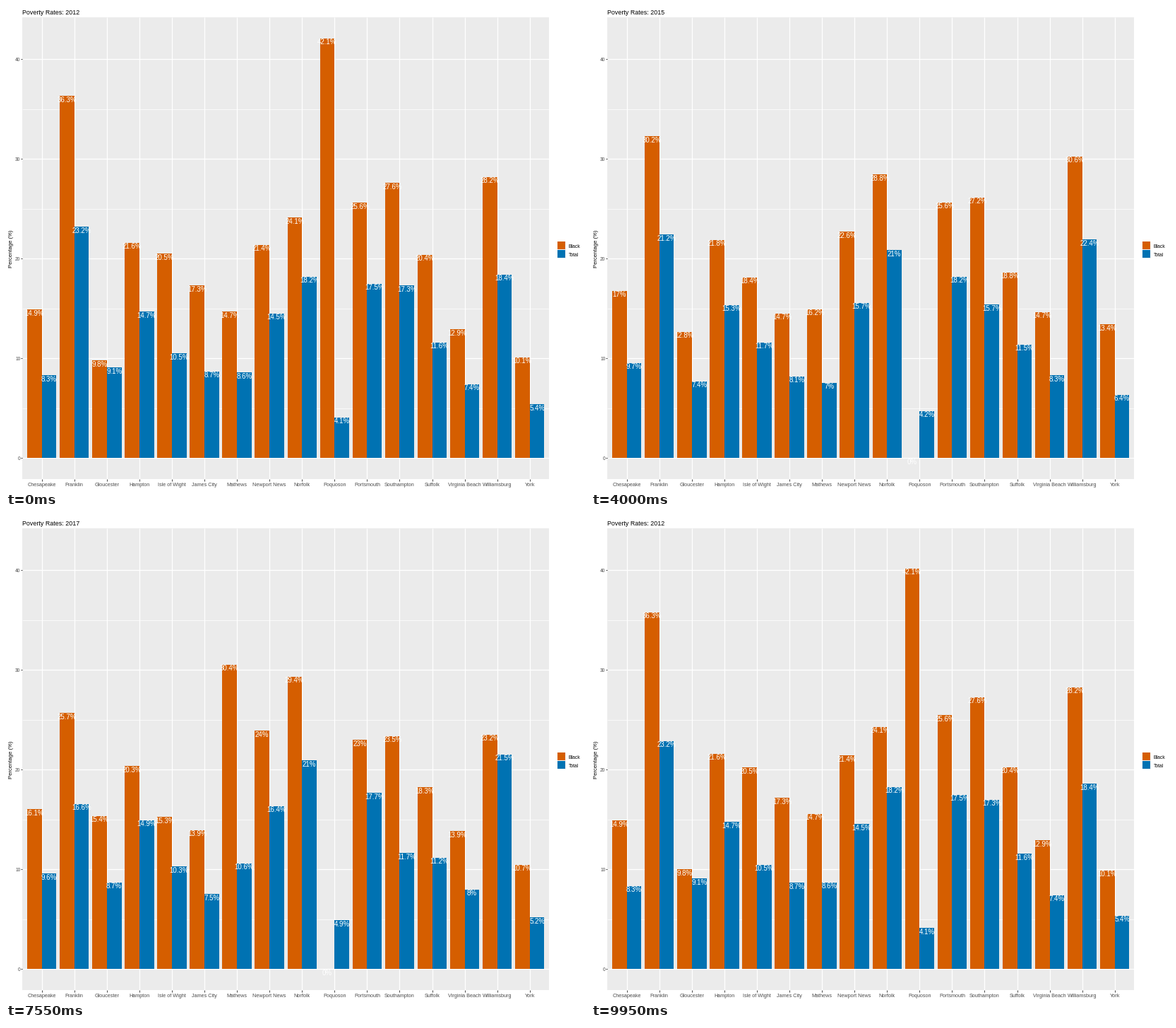
A matplotlib script for the animation above (10 s loop, 820 by 683 pixels).

```python
import math

import matplotlib.pyplot as plt
import numpy as np
from matplotlib.animation import FuncAnimation
from matplotlib.patches import Rectangle

W, H, DPI = 820, 683, 64
PT = 72 / DPI
LEFT, RIGHT, TOP, BOTTOM = 23, 769.4, 16, 669
ORANGE, BLUE = "#D55E00", "#0072B2"

CITIES = ["Chesapeake", "Franklin", "Gloucester", "Hampton", "Isle of Wight",
          "James City", "Mathews", "Newport News", "Norfolk", "Poquoson",
          "Portsmouth", "Southampton", "Suffolk", "Virginia Beach",
          "Williamsburg", "York"]

BLACK = np.array([
    [14.9, 36.3, 9.8, 21.6, 20.5, 17.3, 14.7, 21.4, 24.1, 42.1, 25.6, 27.6, 20.4, 12.9, 28.2, 10.1],
    [14.3, 33.5, 12.7, 21.7, 21.9, 16.5, 14.8, 22.8, 25.7, 0, 26.4, 26, 19.5, 13.5, 25.9, 12.7],
    [16.2, 38.2, 12.3, 22.1, 17.3, 14, 11.4, 23, 27.5, 0, 25.8, 23.1, 18.1, 14.5, 29.3, 13.5],
    [17, 30.2, 12.8, 21.8, 18.4, 14.7, 16.2, 22.6, 28.8, 0, 25.6, 27.2, 18.8, 14.7, 30.6, 13.4],
    [15.8, 25.6, 17.3, 21.7, 17.1, 13.6, 14.5, 23.5, 29.5, 0, 24.8, 27.7, 18.6, 13.7, 30.1, 13.6],
    [16.1, 25.7, 15.4, 20.3, 15.3, 13.9, 30.4, 24, 29.4, 0, 23, 23.5, 18.3, 13.9, 23.2, 10.7],
    [14.6, 25, 14.2, 21.4, 14.3, 14.7, 33.6, 22.2, 28.2, 0, 22.7, 20.5, 17, 12.8, 30, 5.6],
])
TOTAL = np.array([
    [8.3, 23.2, 9.1, 14.7, 10.5, 8.7, 8.6, 14.5, 18.2, 4.1, 17.5, 17.3, 11.6, 7.4, 18.4, 5.4],
    [8.5, 23, 9.2, 14.9, 12, 8.7, 10.1, 15.2, 19.2, 5.6, 18.4, 16, 11.4, 7.9, 19.5, 5.7],
    [9.1, 25.8, 8.6, 15.5, 11.3, 8.5, 9.1, 15.2, 20.5, 6.2, 18.2, 14.5, 11.1, 8.3, 20.5, 6.2],
    [9.7, 21.2, 7.4, 15.3, 11.7, 8.1, 7, 15.7, 21, 4.2, 18.2, 15.7, 11.5, 8.3, 22.4, 6.4],
    [9.5, 16.7, 7.6, 15.7, 11, 7.9, 9.6, 16.1, 21, 4.8, 18.1, 14.7, 11.5, 8.2, 22.8, 6.2],
    [9.6, 16.6, 8.7, 14.9, 10.3, 7.5, 10.6, 16.4, 21, 4.9, 17.7, 11.7, 11.2, 8, 21.5, 5.2],
    [9, 16.2, 8.5, 15.8, 10, 7.8, 10.8, 15.5, 19.7, 4.5, 17.2, 10.2, 10.8, 7.6, 22.4, 4.7],
])
YEARS = len(BLACK)

# Each year holds until LEAVE, then moves evenly to the next one at ARRIVE.
LEAVE = [5, 34, 63, 92, 121, 150, 178]
ARRIVE = [28, 57, 86, 115, 144, 172, 200]
KNOTS = [f for pair in zip(LEAVE, ARRIVE) for f in pair]
PHASES = [p for i in range(YEARS) for p in (i, i + 1)]

UNIT_X = (RIGHT - LEFT) / 16.2
UNIT_Y = (BOTTOM - TOP) / (42.1 * 1.1)
BASE = BOTTOM - 42.1 * 0.05 * UNIT_Y
BAR = 0.45 * UNIT_X

plt.rcParams["font.family"] = "Liberation Sans"
fig = plt.figure(figsize=(W / DPI, H / DPI), dpi=DPI, facecolor="white")
ax = fig.add_axes([0, 0, 1, 1])
ax.set_xlim(0, W)
ax.set_ylim(H, 0)
ax.axis("off")


def to_y(value):
    return BASE - value * UNIT_Y


def to_x(i):
    return LEFT + (i + 0.6) * UNIT_X


def box(x, y, w, h, color, z=1):
    return ax.add_patch(Rectangle((x, y), w, h, fc=color, lw=0, zorder=z))


def line(xs, ys, color, px, z=2):
    ax.plot(xs, ys, color=color, lw=px * PT, zorder=z, solid_capstyle="butt")


def write(x, y, s, px, color="black", ha="left", va="baseline", **kw):
    return ax.text(x, y, s, fontsize=px * PT, color=color, ha=ha, va=va,
                   zorder=5, **kw)


def draw_frame():
    box(LEFT, TOP, RIGHT - LEFT, BOTTOM - TOP, "#EBEBEB")
    for v in range(0, 45, 5):
        major = v % 10 == 0
        if v:
            line([LEFT, RIGHT], [to_y(v)] * 2, "white", 1.2 if major else 0.7)
        if major:
            line([LEFT, RIGHT], [to_y(v)] * 2, "white", 1.2)
            line([LEFT - 2.5, LEFT], [to_y(v)] * 2, "#333333", 0.9)
            write(20.3, to_y(v) + 3, str(v), 6.6, "#4D4D4D", "right")
    for i, city in enumerate(CITIES):
        line([to_x(i)] * 2, [TOP, BOTTOM], "white", 1.2)
        line([to_x(i)] * 2, [BOTTOM, BOTTOM + 2.5], "#333333", 0.9)
        write(to_x(i), 678.7, city, 7.25, "#4D4D4D", "center")
    write(8, 343.5, "Percentage (%)", 7.6, ha="center", va="center", rotation=90)
    box(780.5, 332.5, 12, 24, "#F2F2F2")
    for y, color, name in ((333, ORANGE, "Black"), (345, BLUE, "Total")):
        box(781, y, 11, 11, color, 3)
        write(796.7, y + 9, name, 6.7)


def make_series(values, color, side):
    bars, labels = [], []
    for i in range(len(CITIES)):
        x = to_x(i) + side * BAR
        bars.append(box(x, BASE, BAR, 0, color, 3))
        labels.append(write(x + BAR / 2, BASE, "", 9.7, "white", "center"))
    return values, bars, labels


draw_frame()
title = write(22.7, 11.6, "", 8.9)
series = [make_series(BLACK, ORANGE, -1), make_series(TOTAL, BLUE, 0)]


def update(frame):
    phase = np.interp(frame, KNOTS, PHASES)
    now = math.floor(phase)
    mix = phase - now
    near = math.floor(phase + 0.5 + 1e-9) % YEARS
    title.set_text(f"Poverty Rates: {2012 + near}")
    for values, bars, labels in series:
        heights = (1 - mix) * values[now % YEARS] + mix * values[(now + 1) % YEARS]
        for h, shown, bar, label in zip(heights, values[near], bars, labels):
            bar.set_y(to_y(h))
            bar.set_height(h * UNIT_Y)
            label.set_y(to_y(h) + 8.5)
            label.set_text(f"{shown:g}%")
    return []


anim = FuncAnimation(fig, update, frames=200, interval=50, repeat=True,
                     repeat_delay=0, init_func=lambda: update(0))
plt.show()
```
